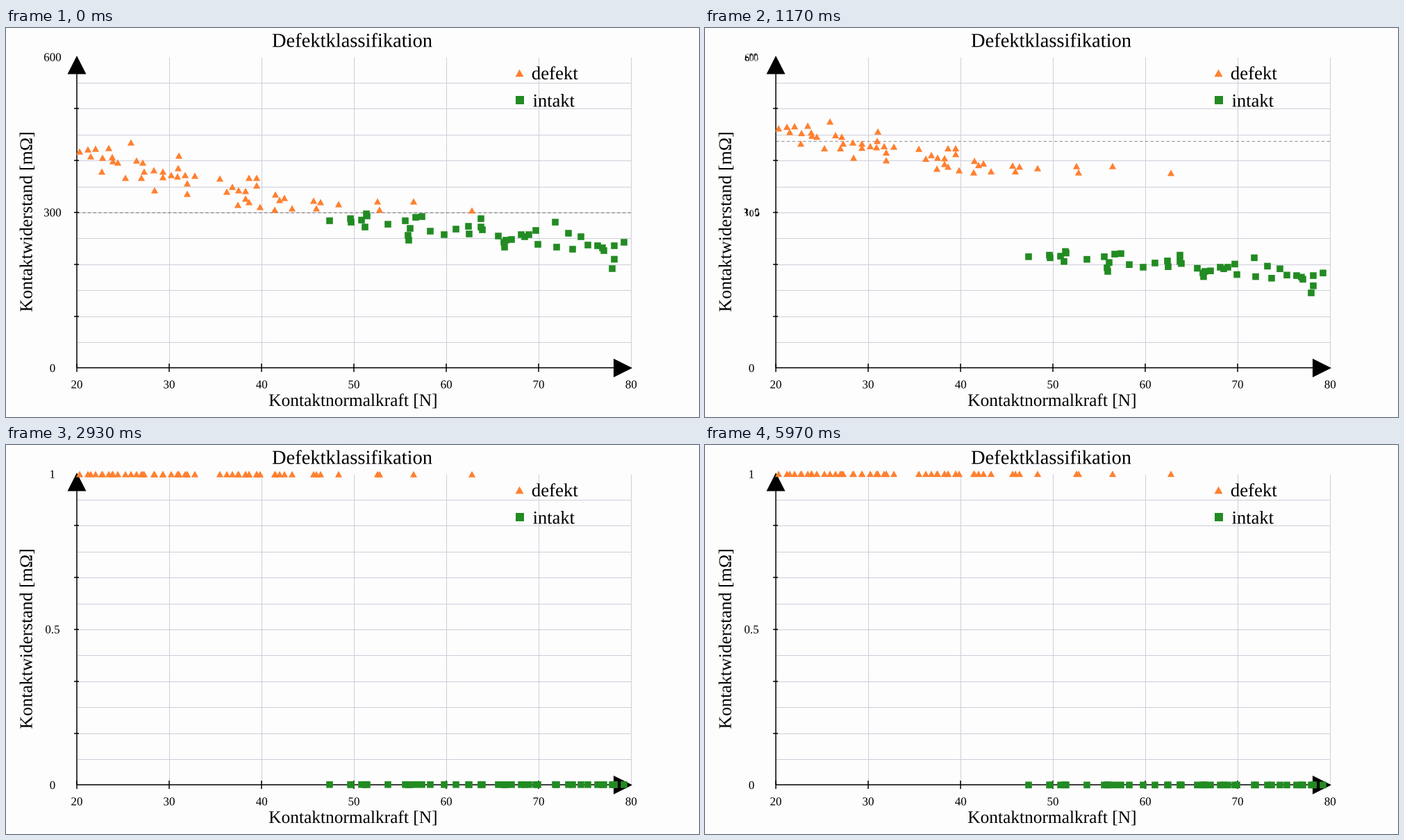
Write a matplotlib script that moves like this. It is 998 px wide and 561 px high and loops after 6 s.

```python
import numpy as np
import matplotlib.pyplot as plt
from matplotlib.animation import FuncAnimation
from matplotlib.collections import PolyCollection
from matplotlib.patches import PathPatch, Polygon
from matplotlib.path import Path
from matplotlib.textpath import TextPath
from matplotlib.transforms import Affine2D

W, H, FPS = 998, 561, 30
FRAMES, MOVE = 6 * FPS, 3 * FPS
LEFT, RIGHT, TOP, BASE = 102, 900.3, 41.5, 490.3
MID = (TOP + BASE) / 2
ORANGE, GREEN, GRID = "#ff8030", "#228b22", "#cecedb"
EM = 17

plt.rcParams["font.family"] = "Liberation Serif"
fig = plt.figure(figsize=(W / 100, H / 100), dpi=100, facecolor="#fdfdfd")
ax = fig.add_axes([0, 0, 1, 1])
ax.set(xlim=(0, W), ylim=(H, 0))
ax.axis("off")

# Measurements in stage pixels: x, y
defect = np.reshape([
    106, 178, 118, 175, 122, 185, 129, 174, 138, 207, 139, 187, 148, 173,
    153, 186, 154, 192, 161, 194, 172, 216, 180, 165, 188, 191, 195, 216,
    197, 194, 199, 207, 213, 205, 214, 234, 226, 207, 226, 215, 238, 212,
    247, 214, 248, 202, 249, 184, 258, 212, 261, 239, 261, 224, 272, 213,
    308, 217, 318, 236, 326, 229, 334, 255, 335, 234, 345, 235, 345, 246,
    350, 216, 350, 251, 361, 216, 361, 227, 366, 258, 387, 262, 388, 240,
    394, 248, 401, 245, 412, 260, 443, 249, 447, 260, 453, 251, 479, 254,
    535, 250, 538, 262, 587, 250, 671, 263], (-1, 2)).astype(float)
intact = np.reshape([
    466, 278, 496, 275, 497, 280, 512, 277, 517, 287, 519, 268, 520, 271,
    550, 283, 575, 278, 579, 299, 580, 306, 582, 289, 590, 273, 599, 272,
    611, 293, 631, 298, 648, 290, 666, 286, 667, 297, 684, 287, 684, 275,
    686, 291, 709, 300, 717, 309, 718, 316, 720, 306, 728, 305, 742, 298,
    747, 301, 753, 298, 763, 292, 766, 312, 791, 280, 793, 316, 810, 296,
    816, 319, 828, 301, 838, 313, 852, 314, 859, 317, 861, 321, 873, 347,
    876, 333.5, 876, 314, 890, 309], (-1, 2)).astype(float)

TRIANGLE = np.array([(-0.5, 0.45), (0.5, 0.45), (0, -0.45)])
SQUARE = np.array([(-0.5, -0.5), (0.5, -0.5), (0.5, 0.5), (-0.5, 0.5)])


def line(x0, y0, x1, y1, color="black", px=1.5, **kw):
    return ax.plot([x0, x1], [y0, y1], color=color, lw=px * 0.72,
                   solid_capstyle="butt", **kw)[0]


def label(text, cx, cy, size, angle=0):
    path = TextPath((0, 0), text, size=size)
    box = path.get_extents()
    move = (Affine2D().translate(-(box.x0 + box.x1) / 2, -(box.y0 + box.y1) / 2)
            .scale(1, -1).rotate_deg(angle).translate(cx, cy))
    ax.add_patch(PathPatch(move.transform_path(path), fc="black", lw=0, zorder=4))


def place(shape, size, points):
    return points[:, None, :] + shape * size


def marks(shape, size, points, color):
    coll = PolyCollection(place(shape, size, points), facecolors=color,
                          linewidths=0, zorder=5)
    coll.set_snap(False)
    ax.add_collection(coll, autolim=False)
    return coll


def resample(poly, n=120):
    walk = np.r_[0, np.cumsum(np.hypot(*np.diff(poly, axis=0).T))]
    at = np.linspace(0, walk[-1], n, endpoint=False)
    return np.column_stack([np.interp(at, walk, c) for c in poly.T])


def glyphs(text, cx, cy):
    """Contours of each character, the whole word centred on (cx, cy)."""
    out, x = [], 0
    for ch in text:
        polys = TextPath((0, 0), ch, size=100).to_polygons()
        out.append([resample(p) * (EM / 100, -EM / 100) + (x, 0) for p in polys])
        x += EM * (0.25 if ch == "." else 0.5)
    pts = np.vstack([c for g in out for c in g])
    shift = (cx, cy) - (pts.min(0) + pts.max(0)) / 2
    return [[c + shift for c in g] for g in out]


def pad(contours, n):
    """Add contours collapsed onto the last point."""
    return contours + [np.tile(contours[-1][-1], (len(contours[-1]), 1))] * (n - len(contours))


class Morph:
    """Word whose outlines flow into another; surplus characters fade."""

    def __init__(self, old, new, cx, cy):
        a, b = glyphs(old, cx, cy), glyphs(new, cx, cy)
        self.parts = []
        for i, g in enumerate(a):
            goal = b[min(i, len(b) - 1)]
            n = max(len(g), len(goal))
            patch = ax.add_patch(PathPatch(Path([(0, 0)]), fc="black", lw=0, zorder=4))
            self.parts.append((patch, pad(g, n), pad(goal, n), i >= len(b)))

    def set(self, s):
        for patch, a, b, fades in self.parts:
            rings = [p * (1 - s) + q * s for p, q in zip(a, b)]
            patch.set_path(Path.make_compound_path(
                *[Path(np.vstack([r, r[:1]]), closed=True) for r in rings]))
            patch.set_alpha(1 - s if fades else 1)


def smooth(t):
    """Sigmoid easing, scaled to run exactly from 0 to 1."""
    sig = lambda v: 1 / (1 + np.exp(-v))
    err = sig(-5)
    return np.clip((sig(10 * (t - 0.5)) - err) / (1 - 2 * err), 0, 1)


# Grid and axes
for y in np.linspace(TOP, BASE, 13)[1:-1]:
    line(LEFT, y, RIGHT, y, GRID, 1, zorder=1)
for i, x in enumerate(np.linspace(LEFT, RIGHT, 7)):
    if i:
        line(x, TOP, x, BASE, GRID, 1, zorder=1)
    if i < 6:
        line(x, BASE - 6, x, BASE + 6, zorder=3)
    label(str(20 + 10 * i), x, 514, EM)
for y in np.linspace(TOP, BASE, 7)[1:-1]:
    line(LEFT - 3.5, y, LEFT + 3.5, y, zorder=3)
line(LEFT, BASE, 880, BASE, zorder=3)
line(LEFT, 60, LEFT, BASE, zorder=3)
for tip in ([(902, BASE), (875, BASE - 13.5), (875, BASE + 13.5)],
            [(LEFT, 40), (LEFT - 13.5, 66.5), (LEFT + 13.5, 66.5)]):
    ax.add_patch(Polygon(tip, fc="black", lw=0, zorder=3))

# Texts and legend
label("0", 67, 490.5, EM)
label("Defektklassifikation", 498.7, 17.4, 28.5)
label("Kontaktnormalkraft [N]", 499.3, 537.8, 25.4)
label("Kontaktwiderstand [mΩ]", 30.3, 280, 25.9, -90)
label("defekt", 790.7, 64.7, 26.8)
label("intakt", 789, 104.4, 26.5)
marks(TRIANGLE, 12, np.array([[739.5, 65]]), ORANGE)
marks(SQUARE, 12, np.array([[740, 104]]), GREEN)

limit = line(LEFT, MID, RIGHT, MID, "#777777", 1.1, zorder=2, dashes=(4, 3))
ups = marks(TRIANGLE, 10.2, defect, ORANGE)
downs = marks(SQUARE, 9.6, intact, GREEN)
words = [Morph("600", "1", 67, 42), Morph("300", "0.5", 67, 266)]


def toward(points, y, s):
    return np.column_stack([points[:, 0], points[:, 1] * (1 - s) + y * s])


def update(k):
    s = smooth(k / MOVE)
    ups.set_verts(place(TRIANGLE, 10.2, toward(defect, TOP, s)))
    downs.set_verts(place(SQUARE, 9.6, toward(intact, BASE, s)))
    y = MID - 420 * s
    limit.set_ydata([y, y])
    limit.set_alpha(1 - s)
    for word in words:
        word.set(s)
    return []


anim = FuncAnimation(fig, update, frames=FRAMES, interval=1000 / FPS,
                     init_func=lambda: update(0), repeat=True, repeat_delay=0)
plt.show()
```
